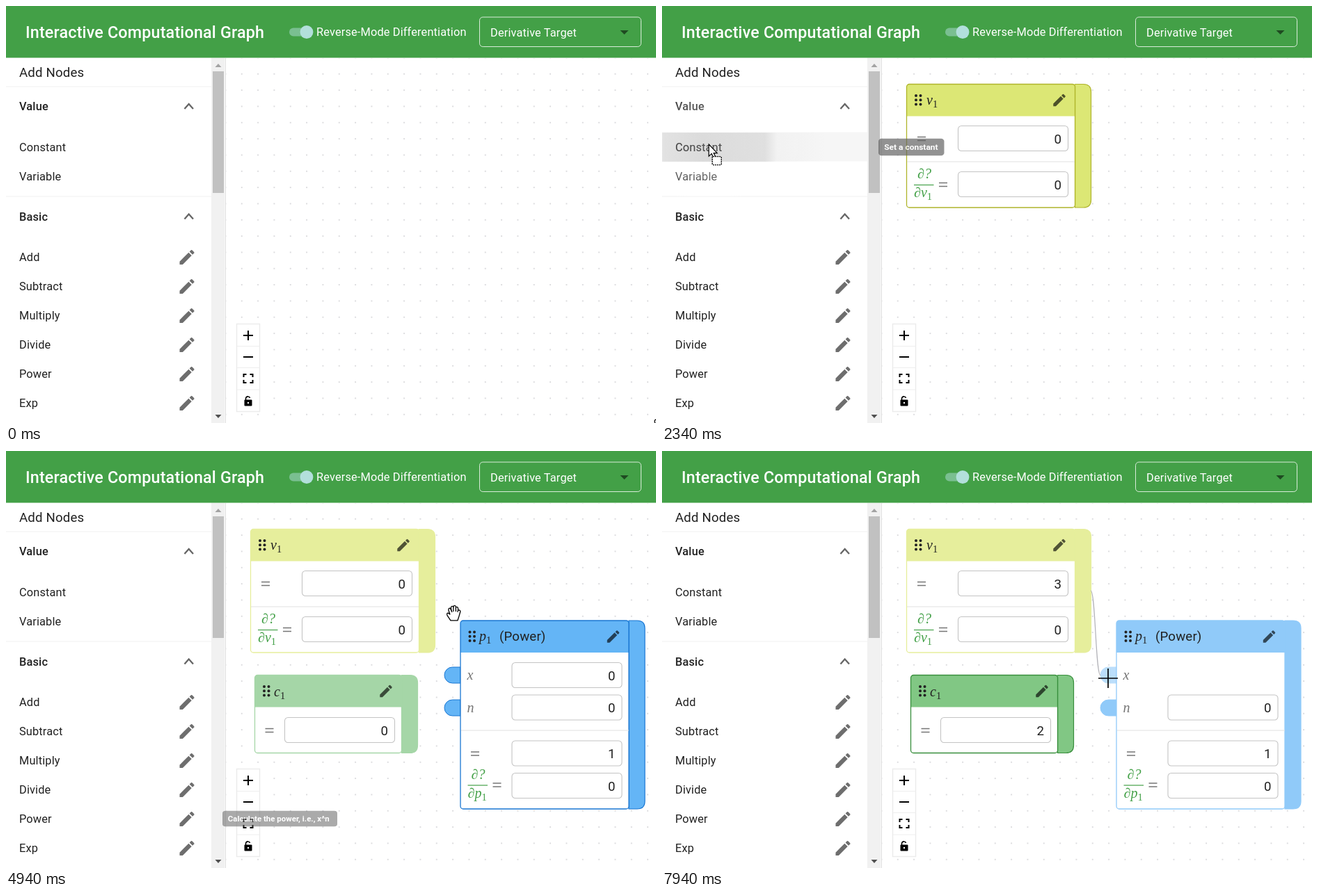
An HTML page that plays this animation: 934x600 px, repeating every 8 s.

```html
<!DOCTYPE html>
<html lang="en">
<head>
<meta charset="utf-8">
<title>Interactive Computational Graph</title>
<style>
html, body { margin: 0; width: 100%; height: 100%; overflow: hidden; background: #fff; }
svg { display: block; width: 934px; height: 600px; }
text { font: 16.33px Roboto, sans-serif; letter-spacing: .16px; fill: #212121; white-space: pre; }
.title { font-size: 23.33px; font-weight: 500; }
.big { font-size: 18.67px; }
.bold { font-weight: 500; }
.white { fill: #fff; }
.tip { font-size: 12.83px; font-weight: 700; letter-spacing: 0; fill: #fff; }
.math { font: italic 20px "Liberation Serif", serif; letter-spacing: 0; }
.num { font-size: 18.67px; text-anchor: end; letter-spacing: 0; }
</style>
</head>
<body>
<svg viewBox="0 0 934 600">
  <defs>
    <pattern id="dots" x="327.1" y="86.1" width="23.333" height="23.333" patternUnits="userSpaceOnUse">
      <circle cx="11.67" cy="11.67" r=".7" fill="#a5a5ab"/>
    </pattern>
    <linearGradient id="fade">
      <stop offset="0" stop-color="#888" stop-opacity=".2"/>
      <stop offset=".2" stop-color="#888" stop-opacity=".28"/>
      <stop offset=".5" stop-color="#888" stop-opacity=".22"/>
      <stop offset=".56" stop-color="#888" stop-opacity=".05"/>
      <stop offset=".8" stop-color="#888" stop-opacity="0"/>
    </linearGradient>
    <radialGradient id="veil">
      <stop offset="0" stop-color="#fff" stop-opacity=".65"/>
      <stop offset="1" stop-color="#fff" stop-opacity="0"/>
    </radialGradient>
    <path id="pen" d="M3 17.25V21h3.75L17.81 9.94l-3.75-3.75L3 17.25zM20.71 7.04c.39-.39.39-1.02 0-1.41l-2.34-2.34a1 1 0 0 0-1.41 0l-1.83 1.83 3.75 3.75 1.83-1.83z"/>
    <g id="hand" fill="#fff" stroke="#000" stroke-width="1.3" stroke-linejoin="round">
      <path d="M-1.8 14V1.5Q0-1 2 1.5V9L2.6 7.5Q5 6.500 6 8.500Q9 7.500 10 9.600Q13 9 13.200 12V18Q13 21 11 23V26H0V23L-5.500 15.500Q-6.500 12-3.500 12.500Z"/>
      <path d="M2 8V13M6 9V13M10 10V14" fill="none"/>
    </g>
    <g id="grab" fill="#fff" stroke="#000" stroke-width="1.3" stroke-linejoin="round">
      <path d="M-5 2L-7-4Q-7-7.500-4.500-6.500L-3-3.500L-3.500-8Q-2-11 0-8.500V-9.500Q2-12 3.500-9V-8Q6-9.500 6.700-6.500V-3.500Q9.500-5 10-2L8 5L6 11H-4L-9 3.500Q-10-.500-7 .500Z"/>
      <path d="M-3-4L-2-1M0-9V-2M3.500-8V-2M6.700-4L6-1" fill="none"/>
    </g>
    <path id="arrow" d="M0 0V17L4 13.300L7 20L10 18.700L7 12.500H12Z" fill="#fff" stroke="#000" stroke-width="1.200"/>
    <g id="drag">
      <use href="#arrow"/>
      <rect x="5" y="17.500" width="13" height="12" rx="1" fill="#fff" stroke="#000" stroke-width="1.400" stroke-dasharray="2 1"/>
    </g>
    <path id="ibeam" d="M-4-9H-1L0-8L1-9H4M0-8V8M-4 9H-1L0 8L1 9H4" fill="none" stroke="#000" stroke-width="1.800"/>
    <path id="cross" d="M-14 0H14M0-14V14" stroke="#000" stroke-width="1.700"/>
  </defs>
  <g id="back"></g>
  <g id="scene"></g>
</svg>
<script>
const $ = id => document.getElementById(id);
const rect = (x, y, w, h, fill, more = '') =>
  `<rect x="${x}" y="${y}" width="${w}" height="${h}" fill="${fill}" ${more}/>`;
const path = (d, stroke, width = 1, fill = 'none') =>
  `<path d="${d}" stroke="${stroke}" stroke-width="${width}" fill="${fill}"/>`;
const text = (x, y, s, cls = '', more = '') => `<text x="${x}" y="${y}" class="${cls}" ${more}>${s}</text>`;
const pen = (x, y, scale, more = 'opacity=".57"') =>
  `<use href="#pen" transform="translate(${x} ${y}) scale(${scale}) translate(-12 -12)" ${more}/>`;

const ops = ['Add', 'Subtract', 'Multiply', 'Divide', 'Power', 'Exp'];
const rows = [['Constant', 203], ['Variable', 245], ...ops.map((s, i) => [s, 361 + 42 * i])];
const rowY = Object.fromEntries(rows);

function header() {
  return rect(0, 0, 934, 74.500, '#43a047') + text(28, 46, 'Interactive Computational Graph', 'title white') +
    rect(407, 31.500, 33, 12, '#b2dfdb', 'rx="6" opacity=".5"') + '<circle cx="432" cy="37.500" r="9.400" fill="#b2dfdb"/>' +
    text(446, 43, 'Reverse-Mode Differentiation', 'white') +
    rect(680.500, 16, 232, 42.500, 'none', 'rx="4.700" stroke="#d9ecda"') +
    text(696, 44, 'Derivative Target', 'white') + path('M882.500 35H894.500L888.500 41Z', 'none', 0, '#1f4a21');
}

function sidebar(hover) {
  const chevron = y => path(`M256.500 ${y + 4}L262.700 ${y - 3}L269 ${y + 4}`, '#666', 2.300);
  let s = rect(0, 74.500, 315, 526, '#fff') + text(19, 101.500, 'Add Nodes', 'big');
  for (const [name, a] of hover) s += rect(0, rowY[name] - 21.500, 295, 42, '#000', `opacity="${a}"`);
  s += path('M0 116H295M0 274H295', '#f1f1f1');
  s += text(19, 150, 'Value', 'bold') + chevron(144) + text(19, 308.500, 'Basic', 'bold') + chevron(302.500);
  rows.forEach(([name, y], i) => s += text(19, y + 6, name) + (i > 1 ? pen(260, y + .5, 1.167) : ''));
  return s + rect(295, 74.500, 19.500, 526, '#f1f1f1') + rect(297, 94, 16, 175, '#c1c1c1') +
    path('M300.500 88H309.500L305 83Z', 'none', 0, '#a3a3a3') + path('M300.500 588H309.500L305 593Z', 'none', 0, '#505050') +
    path('M315.500 75V600', '#e0e0e0');
}

function controls() {
  return rect(331.500, 457.500, 33, 126, '#fff', 'stroke="#ececec" stroke-width="1.500"') +
    path('M332 489.500H364M332 520.500H364M332 552H364', '#eee') +
    path('M341 474H355M348 467V481M341 505H355', '#000', 2) +
    path('M341.500 534V530H345.500M350.500 530H354.500V534M354.500 538V542H350.500M345.500 542H341.500V538', '#000', 2) +
    rect(342.500, 566.500, 11, 9, '#000', 'rx="1"') + path('M344.500 567V564.500Q345.500 561.500 348 562Q350 562 350.500 564', '#000', 1.600) +
    '<circle cx="348" cy="571" r="1.200" fill="#fff"/>';
}

const symbol = (x, y, c, fill = '#222') => text(x, y,
  `${c}<tspan dy="4" font-size="14.500" font-style="normal">1</tspan>`, 'math', `style="fill:${fill}"`);
const equal = (x, y) => path(`M${x - 6} ${y - 2.500}h12m-12 5h12`, '#757575', 1.300);
const partial = (x, y, c) => text(x + 5, y - 9, '∂?', 'math', 'style="fill:#43a047"') +
  path(`M${x} ${y + .5}h28.500`, '#43a047', 1.200) + symbol(x, y + 18, '∂' + c, '#43a047') + equal(x + 42, y);

function input(x, y, value, focus, caret) {
  return rect(x + .5, y + .5, 158, 36, '#fff', `rx="4.700" stroke="${focus ? '#43a047' : '#c4c4c4'}" stroke-width="${focus ? 2.200 : 1.100}"`) +
    text(x + 149, y + 25.500, value, 'num') + (caret ? path(`M${x + 138.500} ${y + 8}v21`, '#222') : '');
}

// Node frame: body, header, output strip, drag dots, edit icon.
function frame(x, y, w, h, [light, dark, line], picked, stripFill) {
  const fill = picked ? dark : light, edge = picked ? line : light, r = x + w, b = y + h;
  let s = path(`M${r} ${y}h12q11 0 11 11v${h - 22}q0 11 -11 11h-12z`, edge, 1.200, stripFill || fill) +
    rect(x, y, w, h, '#fff', 'rx="4"') + path(`M${x} ${y + 46}V${y + 4}q0 -4 4 -4H${r}V${y + 46}Z`, 'none', 0, fill) +
    rect(x, y, w, h, 'none', `rx="4" stroke="${edge}" stroke-width="1.300"`);
  for (let i = 0; i < 6; i++)
    s += `<circle cx="${x + 13.500 + i % 2 * 6.500}" cy="${y + 16.500 + (i >> 1) * 6.200}" r="2" fill="#222"/>`;
  return s + pen(r - 22.500, y + 23, .97, 'opacity=".65"');
}

const lime = ['#e6ee9c', '#dce775', '#afb42b'];
const green = ['#a5d6a7', '#81c784', '#388e3c'];
const blue = ['#90caf9', '#64b5f6', '#1976d2'];

function variableNode(t, picked) {
  const focus = t >= 5266 && t < 6190;
  return frame(351.500, 112.500, 242, 177.500, lime, picked, t >= 6980 && t < 7320 ? '#f0f4c3' : '') +
    symbol(380, 142, 'v') + path('M352 224H593', '#e0e0e0') + equal(373, 191) +
    input(425, 172, t >= 5730 ? 3 : 0, focus, focus) + partial(362, 257, 'v') + input(425, 238, 0);
}

function constantNode(t, picked) {
  const focus = t >= 6190 && t < 7190;
  return frame(357.500, 322.500, 211, 112, green, picked) + symbol(385, 353, 'c') + equal(378.500, 402) +
    input(400, 383, t >= 6595 ? 2 : 0, focus, focus && t < 7000);
}

function powerNode(t, picked) {
  const linked = t >= 7860, fill = picked ? blue[1] : blue[0], edge = picked ? blue[2] : fill;
  const tab = (y, f) => path(`M653 ${y}h-11.500a11.500 11.500 0 0 0 0 23h11.500z`, f === fill ? edge : f, 1, f);
  return tab(311, t >= 7530 ? '#bbdefb' : fill) + tab(358, fill) + frame(653, 244, 242, 271, blue, picked) +
    symbol(680, 273, 'p') + text(709, 273, '(Power)', 'big') +
    text(662.500, 328.500, 'x', 'math', 'style="fill:#757575"') + text(662.500, 375.500, 'n', 'math', 'style="fill:#757575"') +
    (linked ? '' : input(726.500, 304, 0)) + input(726.500, 350.500, 0) + path('M654 402H895', '#e0e0e0') +
    equal(674, 435.500) + input(726.500, 416.500, 1) + partial(663.500, 480.500, 'p') + input(726.500, 463, 0);
}

// Cursor stops: time, x, y, shape used from then on.
const track = [
  [0, 939, 602, 'grab'], [133, 890, 575, 'grab'], [200, 700, 500, 'grab'], [266, 430, 395, 'grab'], [333, 210, 310, 'hand'],
  [400, 135, 275, 'hand'], [533, 128, 270, 'hand'], [733, 67, 238, 'hand'], [933, 67, 238, 'drag'], [1333, 370, 132, 'drag'],
  [1400, 384, 127, 'drag'], [1600, 341, 101, 'drag'], [1733, 341, 101, 'grab'], [1933, 265, 140, 'hand'], [2200, 67, 199, 'hand'],
  [2333, 67, 199, 'drag'], [2666, 347, 311, 'drag'], [2866, 347, 311, 'grab'], [3000, 330, 325, 'grab'], [3133, 210, 385, 'hand'],
  [3266, 108, 454, 'hand'], [3533, 45, 523, 'hand'], [3666, 41, 525, 'hand'], [3733, 60, 520, 'drag'], [4000, 576, 339, 'drag'],
  [4066, 660, 288, 'drag'], [4200, 672, 255, 'drag'], [4400, 643, 233, 'drag'], [4533, 643, 233, 'grab'], [4933, 643, 233, 'grab'],
  [5133, 575, 203, 'ibeam'], [5266, 553, 206, 'ibeam'], [5533, 553, 222, 'ibeam'], [5600, 553, 238, 'ibeam'], [5800, 553, 238, 'ibeam'],
  [6133, 528, 404, 'ibeam'], [6733, 535, 400, 'ibeam'], [6866, 580, 310, 'arrow'], [6933, 600, 225, 'cross'], [7000, 603, 201, 'cross'],
  [7133, 603, 201, 'cross'], [7400, 625, 270, 'cross'], [7600, 641, 327, 'cross'], [8000, 641, 327, 'cross']
];

function cursorAt(t) {
  let i = 0;
  while (i < track.length - 2 && t >= track[i + 1][0] - 1) i++;
  const [t0, x0, y0, shape] = track[i], [t1, x1, y1] = track[i + 1];
  const p = Math.max(0, Math.min(1, (t - t0) / (t1 - t0)));
  return { x: x0 + (x1 - x0) * p, y: y0 + (y1 - y0) * p, shape };
}

// Drags: row, pick-up, drop, grab point.
const drags = [['Variable', 933, 1665, 67, 238], ['Constant', 2333, 2865, 67, 199], ['Power', 3733, 4530, 41, 525]];

function ghost(t, c) {
  const drag = drags.find(d => t >= d[1] && t < d[2]);
  if (!drag) return '';
  const [name, , , gx, gy] = drag, dx = c.x - gx, dy = c.y - gy, y0 = rowY[name] + dy;
  let s = `<ellipse cx="${c.x}" cy="${c.y}" rx="140" ry="90" fill="url(#veil)"/>` +
    rect(dx, y0 - 21, 295, 42, 'url(#fade)');
  const at = rows.findIndex(r => r[0] === name);
  rows.forEach(([label, y], i) => {
    const far = Math.abs(y - rowY[name]);
    if (far > 84 || (at < 2 && i !== at)) return;
    const a = i === at ? .62 : far > 50 ? .22 : .45;
    s += text(dx + 19, y + dy + 6, label, '', `opacity="${a}"`);
    if (i > 1) s += pen(dx + 260, y + dy + .5, 1.167, 'opacity=".08"');
  });
  return s;
}

// Tooltips: text, centre, width, time in, time out.
const tips = [
  ['Set a variable', 245, 98, 733, 1733], ['Set a constant', 203, 101, 2200, 2933],
  ['Multiply two numbers, i.e., a * b', 445, 203, 3240, 3333], ['Calculate the power, i.e., x^n', 529, 184.500, 3466, 4870]
];

function tooltip(t, [label, y, w, start, end]) {
  const a = Math.min((t - start) / 180, 1 - (t - end) / 150, 1);
  if (a <= 0) return '';
  const sx = .75 + .25 * a;
  return `<g opacity="${a * .92}" transform="translate(311 ${y}) scale(${sx} ${sx * sx})">` +
    rect(0, -14, w, 28, '#616161', 'rx="4.700"') + text(8.700, 4.500, label, 'tip') + '</g>';
}

function hovers(t, c) {
  const drag = drags.find(d => t >= d[1] && t < d[2]);
  if (drag) return [[drag[0], drag[0] === 'Power' ? .055 : .035]];
  const list = [];
  for (const [name, y] of rows)
    for (const [back, a] of [[0, .03], [67, .02]]) {
      const p = back ? cursorAt(t - back) : c;
      if (p.shape === 'hand' && p.x < 295 && Math.abs(p.y - y) < 21 && !list.some(h => h[0] === name)) list.push([name, a]);
    }
  return list;
}

function draw(t) {
  const c = cursorAt(t);
  const picked = t < 2865 ? 'v' : t < 4530 ? 'c' : t < 5260 ? 'p' : t < 6330 ? 'v' : 'c';
  let s = t >= 1665 ? variableNode(t, picked === 'v') : '';
  if (t >= 2865) s += constantNode(t, picked === 'c');
  if (t >= 4530) s += powerNode(t, picked === 'p');
  if (t >= 7190) {
    const [x, y] = t >= 7860 ? [630, 322.500] : [c.x, c.y], m = (616 + x) / 2;
    s += path(`M616 201C${m} 201 ${m} ${y} ${x} ${y}`, '#b1b1b7', 1.200);
  }
  s += controls() + sidebar(hovers(t, c)) + ghost(t, c) + tips.map(tip => tooltip(t, tip)).join('');
  $('scene').innerHTML = s + header() + `<use href="#${c.shape}" x="${c.x}" y="${c.y}"/>`;
}

$('back').innerHTML = rect(316, 75, 618, 525, 'url(#dots)');
let last = -1;
function tick() {
  const step = Math.floor(performance.now() % 8000 * .015);   // 15 steps per second
  if (step !== last) draw((last = step) / .015);
  requestAnimationFrame(tick);
}
tick();
</script>
</body>
</html>
```
